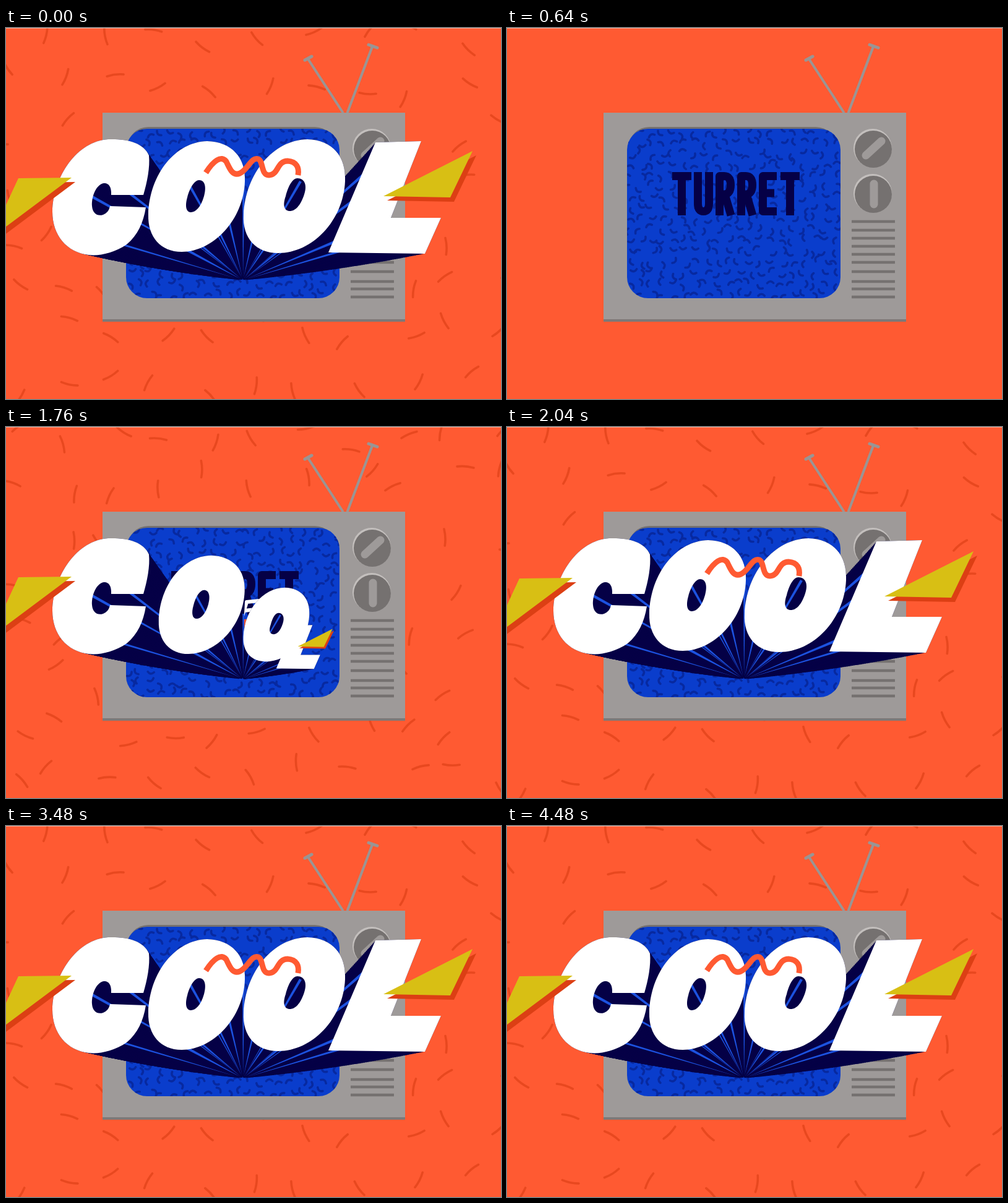
These frames come from a looping animation (800x600 px, 4.64 s). An HTML page with a canvas:

```html
<!DOCTYPE html>
<html lang="en">
<head>
<meta charset="utf-8">
<title>Cool TV</title>
<style>
  html, body { margin: 0; width: 100%; height: 100%; overflow: hidden; background: #ff5a32; }
  canvas { display: block; }
</style>
</head>
<body>
<canvas id="stage" width="800" height="600"></canvas>
<script>
const ctx = document.getElementById('stage').getContext('2d');
const LOOP = 4640, POP_START = 1560, POP_STEP = 40;
const ORANGE = '#ff5a32', CONFETTI = '#e8481f', GREY = '#9e9a99', DARK_GREY = '#757170',
      BLUE = '#0a3dcc', DEEP_BLUE = '#0729a0', NAVY = '#050046', RAY = '#1c52e0',
      YELLOW = '#d8bf14', SHADOW = '#dc3f14', STRIPE = '#bd4038';
const VANISH = { x: 383, y: 408 };
const GROWTH = [0, .12, .39, .65, .89, 1];

const fill = (shape, color) => { ctx.fillStyle = color; ctx.fill(shape, 'evenodd'); };

function stroke(shape, color, width, cap = 'round') {
  Object.assign(ctx, { strokeStyle: color, lineWidth: width, lineCap: cap, lineJoin: 'round' });
  ctx.stroke(shape);
}

function at(x, y, draw) {
  ctx.save();
  ctx.translate(x, y);
  draw();
  ctx.restore();
}

function seeded(seed) {
  return () => {
    seed = (seed * 16807) % 2147483647;
    return seed / 2147483647;
  };
}

// Jittered grid of short bent strokes.
function scatter(seed, x0, y0, x1, y1, gap, length, bend) {
  const random = seeded(seed), path = new Path2D();
  for (let y = y0; y < y1; y += gap) {
    for (let x = x0; x < x1; x += gap) {
      const cx = x + gap * (.15 + .7 * random()), cy = y + gap * (.15 + .7 * random());
      const angle = random() * Math.PI * 2, half = length / 2;
      const dx = Math.cos(angle) * half, dy = Math.sin(angle) * half;
      const curve = bend * (random() < .5 ? -1 : 1);
      path.moveTo(cx - dx, cy - dy);
      path.quadraticCurveTo(cx - dy * curve, cy + dx * curve, cx + dx, cy + dy);
    }
  }
  return path;
}

const confetti = [7127, 90121].map(s => scatter(s, -30, -30, 820, 620, 80, 27, .2));
const squiggles = [4211, 38653].map(s => scatter(s, 190, 160, 545, 440, 17.5, 10, 1.1));

const screen = new Path2D();
screen.roundRect(194, 163, 345, 274, 34);
const screenEdge = new Path2D();
screenEdge.roundRect(196, 160, 337, 270, 34);
const antennas = new Path2D('M544 136L488 50M552 136L592 30');
const antennaTips = new Path2D('M483 52L494 46M586 27L600 32');
const vents = new Path2D();
for (const y of [313, 327, 340, 353, 366, 379, 394, 410, 422, 435]) {
  vents.moveTo(557, y);
  vents.lineTo(627, y);
}

function circle(x, y, r, color) {
  ctx.fillStyle = color;
  ctx.beginPath();
  ctx.arc(x, y, r, 0, Math.PI * 2);
  ctx.fill();
}

function drawKnob(y, handle) {
  circle(591, y - 1, 31, '#c3bfbd');
  circle(592, y + 1, 30, DARK_GREY);
  at(592, y, () => stroke(new Path2D(handle), GREY, 13));
}

function drawTv(pattern) {
  stroke(antennas, '#9a9594', 4);
  stroke(antennaTips, '#9a9594', 5);
  ctx.fillStyle = GREY;
  ctx.fillRect(156, 137, 489, 338);
  ctx.fillStyle = '#7d7978';
  ctx.fillRect(156, 471, 489, 4);
  fill(screenEdge, DARK_GREY);
  fill(screen, BLUE);
  ctx.save();
  ctx.clip(screen);
  stroke(pattern, DEEP_BLUE, 3.6);
  ctx.restore();
  drawKnob(195, 'M-12 11L13 -12');
  drawKnob(268, 'M1 -16V17');
  stroke(vents, DARK_GREY, 4.5, 'butt');
}

const GLYPHS = {
  T: 'M0 6.5H31M15.5 0V70',
  U: 'M6.5 0V51Q6.5 63.5 15.5 63.5T24.5 51V0',
  R: 'M6.5 70V6.5H14Q24.5 6.5 24.5 21T14 36H6.5M15 36L25 70',
  E: 'M29 6.5H6.5V63.5H29M6.5 34H25'
};

function drawTopWord() {
  [...'TURRET'].forEach((letter, i) =>
    at(267 + i * 35, 233, () => stroke(new Path2D(GLYPHS[letter]), NAVY, 13, 'butt')));
}

function drawLink() {
  const o = new Path2D();
  o.ellipse(363, 297, 10, 15, .35, 0, Math.PI * 2);
  stroke(o, '#fff', 6);
  stroke(new Path2D('M389 283L380 312M389 283L409 281M385 297L404 295'), '#fff', 6);
}

// Each block letter: outline, striped part and stripe direction.
const BLOCKS = [
  ['M266 311H313V333H303V373H277V333H266Z', 'M277 334H303V373H277Z', Math.PI / 2],
  ['M306 373L340 311L374 373Z', 'M306 373L337 316L346 332L324 373Z', -1.05],
  ['M378 311H400V351H414V373H378Z', 'M378 351H414V373H378Z', 0],
  ['M467 322A31 31 0 1 0 467 362L443 342Z', 'M467 322A31 31 0 0 0 421 320L443 342Z', .75]
].map(([shape, part, angle]) => ({ shape: new Path2D(shape), part: new Path2D(part), angle }));
const stripes = new Path2D();
for (let y = -80; y <= 80; y += 5) {
  stripes.moveTo(-90, y);
  stripes.lineTo(90, y);
}

function drawBottomWord() {
  for (const { shape, part, angle } of BLOCKS) {
    fill(shape, ORANGE);
    ctx.save();
    ctx.clip(part);
    ctx.translate(370, 342);
    ctx.rotate(angle);
    stroke(stripes, STRIPE, 2, 'butt');
    ctx.restore();
  }
}

const LETTERS = [
  {
    face: 'M231 206C233 225 228 250 222 270L170 270C171 256 165 250 158 251C146 253 138 272 139 288' +
      'C140 300 148 305 157 302C164 299 167 294 168 288L226 290C222 315 213 335 195 350' +
      'C175 364 150 369 134 367C98 363 75 335 75 297C76 240 115 183 165 180C195 179 222 185 231 206Z',
    rays: [[120, 330], [134, 270], [190, 260]],
    bolt: 'M106 242L20 243L-25 340Z'
  },
  {
    face: 'M325 183C365 184 388 210 386 248C384 310 335 362 284 362C250 362 229 338 230 302' +
      'C232 235 275 184 325 183Z' +
      'M312 246C322 246 324 258 320 272C315 290 306 298 299 298C291 298 289 288 293 274C297 258 305 246 312 246Z',
    rays: [[236, 330], [267, 345], [292, 332], [294, 250], [330, 300], [355, 290]]
  },
  {
    face: 'M487 180C528 181 550 208 548 248C545 312 495 364 440 364C404 364 382 340 384 302' +
      'C387 235 432 181 487 180Z' +
      'M471 243C483 243 487 255 482 269C476 288 467 296 459 296C449 296 447 286 452 272C456 256 463 243 471 243Z',
    rays: [[384, 245], [406, 310], [432, 335], [460, 345], [476, 248]]
  },
  {
    face: 'M597 185L671 183L622 307H703L677 365L521 363Z',
    rays: [[533, 345], [570, 352], [560, 280], [580, 235]],
    bolt: 'M610 272L754 199L718 274Z'
  }
].map(({ face, rays, bolt }) => ({ face: new Path2D(face), rays, bolt: bolt && new Path2D(bolt) }));

const wave = new Path2D('M323 234C335 215 348 205 356 216C362 228 366 240 378 235C392 228 396 208 408 212' +
  'C416 216 412 238 425 238C440 238 438 215 455 215C470 216 474 226 472 238');

function scaled(size, draw, sag = 0) {
  ctx.save();
  ctx.translate(VANISH.x, VANISH.y + sag);
  ctx.scale(size, size);
  ctx.translate(-VANISH.x, -VANISH.y);
  draw();
  ctx.restore();
}

function drawDepth({ face }, size) {
  const layers = 100;
  for (let i = 3; i <= layers; i++) {
    const s = i / layers;
    scaled(s * size, () => fill(face, NAVY), 16 * s * (1 - s) * size);
  }
}

function drawRays({ rays }) {
  ctx.fillStyle = RAY;
  for (const [x, y] of rays) {
    const dx = x - VANISH.x, dy = y - VANISH.y, k = 2.2 / Math.hypot(dx, dy);
    ctx.beginPath();
    ctx.moveTo(VANISH.x + dx * .04, VANISH.y + dy * .04);
    ctx.lineTo(x - dy * k, y + dx * k);
    ctx.lineTo(x + dy * k, y - dx * k);
    ctx.fill();
  }
}

function drawBolt({ bolt }, nudge) {
  if (!bolt) return;
  at(6, 7 + nudge, () => fill(bolt, SHADOW));
  at(0, nudge, () => fill(bolt, YELLOW));
}

function drawCool(step, wobble) {
  const items = LETTERS
    .map((letter, i) => ({ letter, size: GROWTH[Math.min(5, Math.max(0, step - i))] }))
    .filter(item => item.size > 0);
  for (const { letter, size } of items) drawDepth(letter, size);
  for (const { letter, size } of items) scaled(size, () => drawRays(letter));
  for (const { letter, size } of items) scaled(size, () => fill(letter.face, '#fff'));
  for (const { letter, size } of items) scaled(size, () => drawBolt(letter, wobble * 2));
  if (step >= 8) at(0, wobble * 3, () => stroke(wave, ORANGE, 9, 'butt'));
}

function draw(t) {
  const boil = Math.floor(t / 320) % 2;
  const held = t < 120, cool = held || t >= POP_START;
  ctx.fillStyle = ORANGE;
  ctx.fillRect(0, 0, 800, 600);
  if (cool) stroke(confetti[boil], CONFETTI, 3.6);
  ctx.fillStyle = 'rgba(255,255,255,.45)';
  ctx.fillRect(0, 0, 800, 1);
  drawTv(squiggles[boil]);
  if (t >= 360 && t < 1880) drawTopWord();
  if (t >= 680 && t < 1880) drawLink();
  if (t >= 880 && t < 1880) drawBottomWord();
  if (cool) {
    const step = held ? 20 : Math.floor((t - POP_START) / POP_STEP);
    const wobble = held ? 0 : Math.floor((t - POP_START) / 480) % 2;
    drawCool(step, wobble);
  }
}

const start = performance.now();
function tick() {
  draw((performance.now() - start) % LOOP);
  requestAnimationFrame(tick);
}
tick();
</script>
</body>
</html>
```
